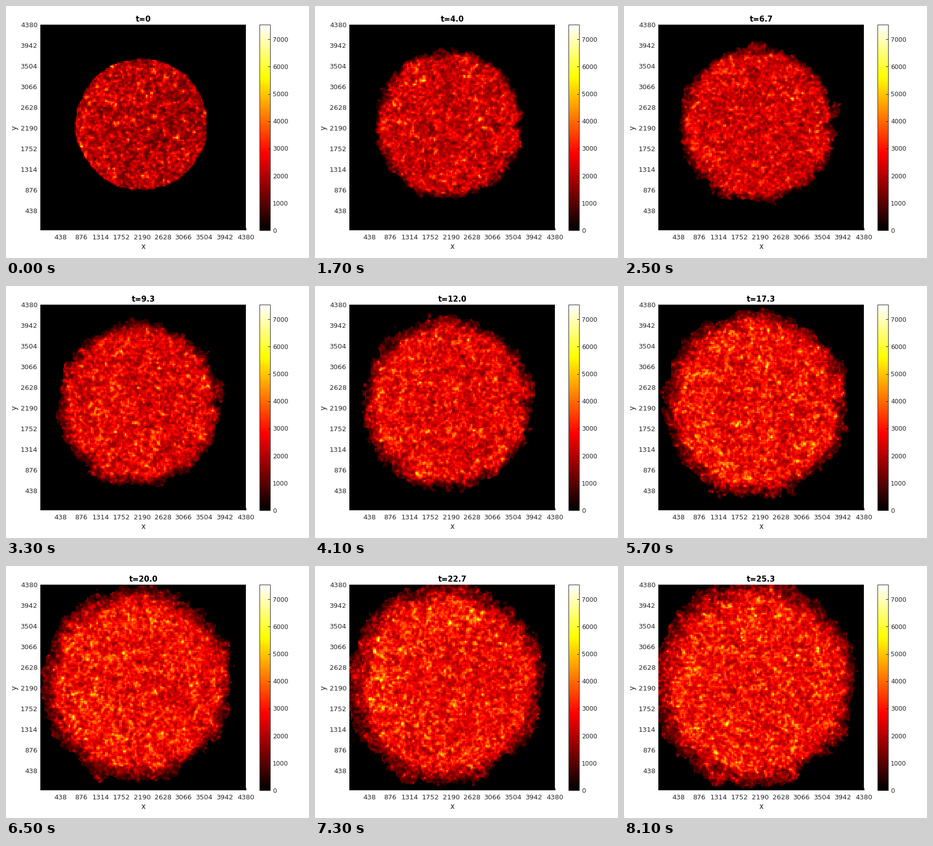
Animation, 600 px wide and 500 px high, one loop 8.2 s. Source, as a matplotlib script:

```python
import matplotlib.pyplot as plt
import numpy as np
from matplotlib.animation import FuncAnimation
from matplotlib.colors import LinearSegmentedColormap

W, H, DPI = 600, 500, 100
FRAMES, STEP, HOLD = 82, 100, 5
N = 146                               # grid cells per side
LEFT, TOP, RIGHT, BOTTOM = 68, 37, 475, 444
VMAX = 7538
INK = "#262626"
KEY = 6                               # frames between noise keys

HOT = LinearSegmentedColormap.from_list(
    "hot0", [(0, "black"), (0.375, "red"), (0.75, "yellow"), (1, "white")])

rng = np.random.default_rng(11)
freq = np.hypot(np.fft.fftfreq(N)[:, None], np.fft.fftfreq(N)[None, :])


def smooth_noise(sigma):
    """Unit-variance Gaussian noise blurred over sigma cells."""
    spec = np.fft.fft2(rng.standard_normal((N, N)))
    field = np.fft.ifft2(spec * np.exp(-2 * (np.pi * sigma * freq) ** 2)).real
    return field / field.std()


def texture():
    return 0.92 * smooth_noise(0.65) + 0.38 * smooth_noise(1.8)


keys = [texture() for _ in range(FRAMES // KEY + 2)]
rough = [smooth_noise(1.0) for _ in keys]
rim = 0.7 * smooth_noise(1.3) + 0.8 * smooth_noise(3)

# Polar coordinates of the cell centres, in pixels
px = LEFT + (np.arange(N) + 0.5) * (RIGHT - LEFT) / N
py = TOP + (np.arange(N) + 0.5) * (BOTTOM - TOP) / N
dx, dy = np.meshgrid(px - 268, py - 235)
radius = np.hypot(dx, dy)
angle = np.degrees(np.arctan2(dy, dx)) % 360

# Front advance by t=20, every 15 degrees clockwise from the right
ADVANCE = [46, 47, 55, 49, 45, 54, 57, 62, 69, 62, 64, 69,
           64, 64, 62, 66, 68, 66, 64, 62, 57, 47, 53, 48]
advance = np.interp(angle, np.arange(0, 360, 15), ADVANCE, period=360)


def blend(fields, k):
    i, f = divmod(k / KEY, 1)
    a = f * np.pi / 2
    return np.cos(a) * fields[int(i)] + np.sin(a) * fields[int(i) + 1]


def density(k):
    t = k / 3
    early = np.exp(-t / 2.5)
    wobble = 0.9 * rim + 0.4 * blend(rough, k)
    front = 131 + advance * (t / 20) ** 0.85 + 2 * (1 - early)
    depth = front + (4.2 - 3.5 * early) * wobble - radius
    band = 2 + 10 * (1 - early) + t * (advance / 57) ** 2
    ramp = np.clip(depth / band, 0, 1)
    level = 0.24 + 0.76 * ramp ** 1.3
    mean = 2000 + 980 * (1 - np.exp(-t / 13))
    mean = mean * (0.95 + 0.08 * np.clip(radius / 150, 0, 1) - 0.0003 * dx)
    spread = 0.22 + 0.07 * early + 0.2 * (1 - ramp)
    value = mean * level * np.exp(spread * blend(keys, k))
    return np.where(depth > 0, value, 0)


fig = plt.figure(figsize=(W / DPI, H / DPI), dpi=DPI, facecolor="white")
ax = fig.add_axes([0, 0, 1, 1])


def label(x, y, s, size, **kw):
    kw = {"color": INK, "ha": "center", "va": "baseline", **kw}
    return ax.text(x, y, s, fontsize=size * 72 / DPI, family="DejaVu Sans", **kw)


def line(xs, ys, color=INK):
    ax.plot(xs, ys, color=color, lw=72 / DPI, snap=False,
            solid_capstyle="butt", solid_joinstyle="miter")


heat = ax.imshow(density(0), cmap=HOT, vmin=0, vmax=VMAX, aspect="auto",
                 interpolation="nearest", extent=(LEFT, RIGHT, BOTTOM, TOP))
line([LEFT, RIGHT + 1], [444.5, 444.5], "black")
line([475.5, 475.5], [441, 445], "black")

for i in range(1, 11):
    value = str(438 * i)
    x = 475 - 41 * (10 - i) if i > 2 else 67.5 + 40.5 * i
    label(x, 463.3, value, 13.3)
    label(62.8, 42 + 40.95 * (10 - i), value, 13.3, ha="right")

# Colour bar
ax.imshow(np.linspace(1, 0, 256)[:, None], cmap=HOT, aspect="auto",
          interpolation="nearest", extent=(502, 523, 445, 38))
line([502.5, 523.5, 523.5, 502.5, 502.5], [37.5, 37.5, 445.5, 445.5, 37.5])
for i in range(8):
    y = 445.5 - 54.1 * i
    line([519, 523], [np.floor(y) + 0.5] * 2)
    label(527.9, y + 4.2, str(1000 * i), 12.3, ha="left")

label(272, 482, "x", 14.67)
label(17.5, 241.5, "y", 14.67, rotation=90, va="center")
title = label(271.7, 31, "t=0", 15, weight="bold", color="black")

ax.set_xlim(0, W)
ax.set_ylim(H, 0)
ax.axis("off")


def update(i):
    k = max(0, i - HOLD)
    heat.set_data(density(k))
    title.set_text("t=0" if i < HOLD else f"t={k / 3:.1f}")
    return heat, title


anim = FuncAnimation(fig, update, frames=FRAMES, interval=STEP,
                     repeat=True, repeat_delay=0)
plt.show()
```
